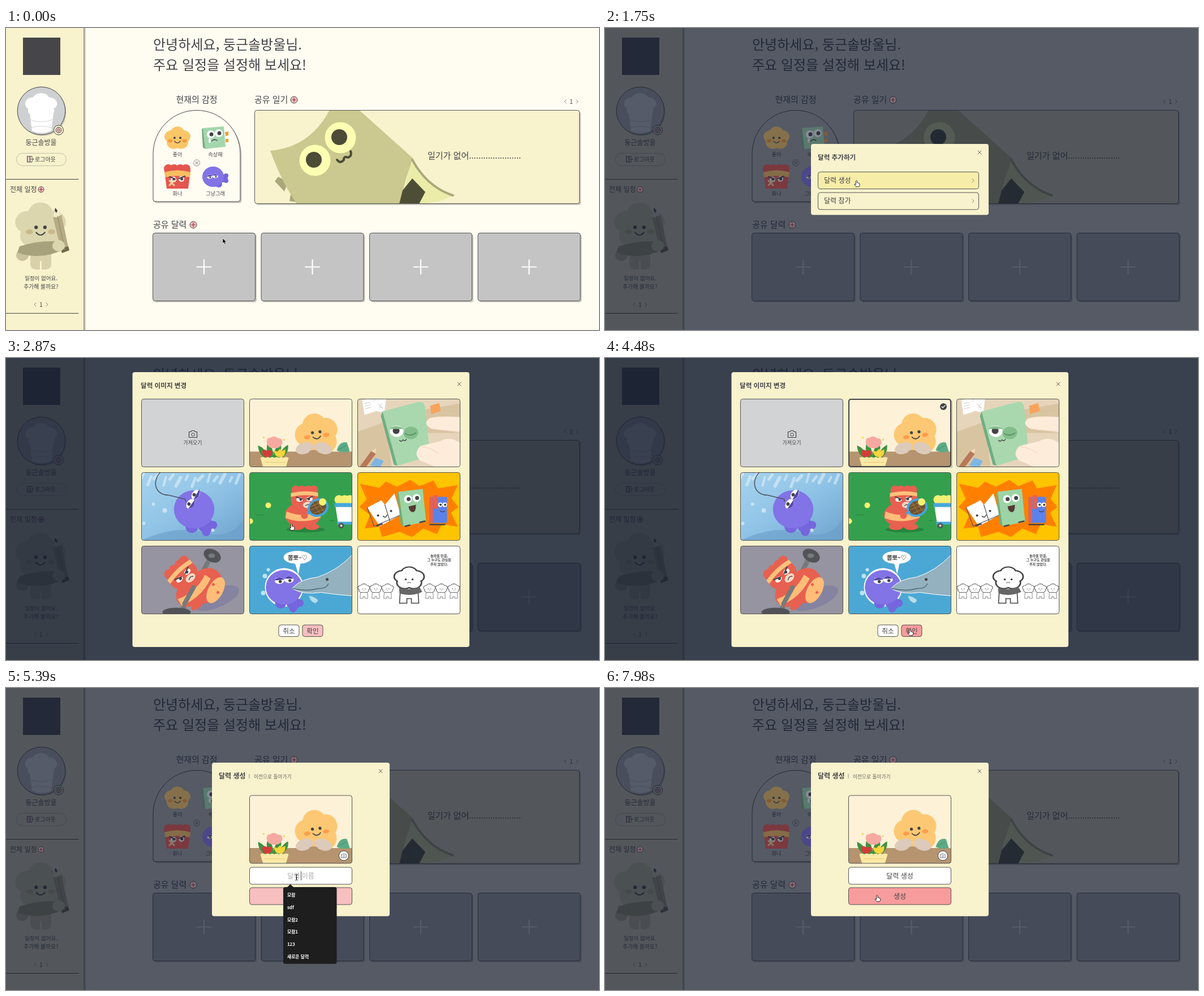
Recreate the animation shown at these times as an HTML page. Size 1048 by 534 pixels, loop 8000 ms.

```html
<!DOCTYPE html>
<html lang="ko">
<head>
<meta charset="utf-8">
<title>달력 만들기</title>
<style>
html, body { margin: 0; width: 100%; height: 100%; overflow: hidden; background: #fffdf2; }
svg { display: block; }
#stage { width: 100vw; height: 100vh; }
text { font-family: "Noto Sans CJK KR", "Noto Sans CJK", "Noto Sans", sans-serif; white-space: pre; }
</style>
</head>
<body>
<svg id="stage" viewBox="0 0 1048 534"></svg>
<script>
const INK = '#444446', PAPER = '#fffdf2', CREAM = '#f8f2cd', PINK = '#f7bfc0', ROSE = '#f79c9d';

// Drawing helpers
const rect = (x, y, w, h, fill, more = '') => `<rect x="${x}" y="${y}" width="${w}" height="${h}" fill="${fill}" ${more}/>`;
const circ = (x, y, r, fill, more = '') => `<circle cx="${x}" cy="${y}" r="${r}" fill="${fill}" ${more}/>`;
const oval = (x, y, rx, ry, fill, turn = 0, more = '') =>
  `<ellipse cx="${x}" cy="${y}" rx="${rx}" ry="${ry}" fill="${fill}" transform="rotate(${turn} ${x} ${y})" ${more}/>`;
const path = (d, fill, more = '') => `<path d="${d}" fill="${fill}" ${more}/>`;
const line = (d, color = INK, w = 1, more = '') =>
  path(d, 'none', `stroke="${color}" stroke-width="${w}" stroke-linecap="round" stroke-linejoin="round" ${more}`);
const text = (x, y, size, str, more = '') => `<text x="${x}" y="${y}" font-size="${size}" fill="${INK}" ${more}>${str}</text>`;
const group = (transform, body) => `<g transform="${transform}">${body}</g>`;
const layer = (id, body) => `<g id="${id}">${body}</g>`;
const MID = 'text-anchor="middle"', BOLD = 'font-weight="700"', EDGE = `stroke="${INK}"`;

const box = (x, y, w, h, fill, more = '') => rect(x, y, w, h, fill, `rx="4" ${EDGE} stroke-width=".9" ${more}`);
const raised = (x, y, w, h, fill) => rect(x + 2.5, y + 2.5, w, h, '#cbc9bd', 'rx="4"') + box(x, y, w, h, fill);
const panel = (x, y, w, h) => rect(x, y, w, h, CREAM, 'rx="4"');
const cross = (x, y, r = 3) => line(`M${x - r} ${y - r}l${2 * r} ${2 * r}m0 ${-2 * r}l${-2 * r} ${2 * r}`, '#555', .9);
const plus = (x, y, r) => circ(x, y, r, PINK, EDGE) + line(`M${x - r * .55} ${y}h${r * 1.1}M${x} ${y - r * .55}v${r * 1.1}`, '#8a3038', 1.2);
const chevron = (x, y, dir) => line(`M${x} ${y - 3}l${3 * dir} 3l${-3 * dir} 3`, '#777', .9);
const pager = (x, y) => chevron(x - 9, y, -1) + text(x, y + 4, 10.5, '1', MID) + chevron(x + 9, y, 1);
const petals = (x, y, dist, r, fill, squash = 1, turn = 0, more = '') => group(`translate(${x} ${y}) scale(1 ${squash})`,
  [0, 1, 2, 3, 4].map(i => {
    const a = (i * 72 - 90 + turn) * Math.PI / 180;
    return circ(dist * Math.cos(a), dist * Math.sin(a), r, fill, more);
  }).join('') + circ(0, 0, dist + 2, fill));
const smile = (x, y, s, cheek, turn = 0) => group(`translate(${x} ${y}) rotate(${turn}) scale(${s})`,
  oval(-15, 4, 5, 3.3, cheek) + oval(15, 4, 5, 3.3, cheek) +
  circ(-6, -2, 2.4, INK) + circ(6, -2, 2.4, INK) + line('M-6 5Q0 12 6 5', INK, 1.6));
const camera = (x, y, s) => group(`translate(${x} ${y}) scale(${s})`,
  line('M-7-4h3l2-2h4l2 2h3v10h-14z', INK, 1.2) + circ(0, 1, 2.8, 'none', EDGE));

// Characters, each around its own origin
const fish = (x, y, s, tailTurn = 0, face = '') => group(`translate(${x} ${y}) scale(${s})`,
  group(`rotate(${tailTurn})`, oval(18, 3, 8, 7, '#7566dd') + circ(23, -2, 4, '#7566dd') + circ(23, 7, 4, '#7566dd') + oval(10, 13, 6, 6, '#7566dd')) +
  oval(0, 0, 19, 18, '#8273e6') + group(face, oval(4, -1, 5, 3.4, '#fff') + oval(-6, 0, 5, 3.4, '#fff') +
  path('M-12 0q6-6 11-1zM-1-2q5-5 10 0z', '#5146a8') + circ(-5, 1, 1.6, INK) + circ(5, 0, 1.6, INK)));
const bandit = transform => group(transform,
  oval(-14, 52, 13, 6, '#e8604f') + oval(14, 52, 13, 6, '#e8604f') + oval(-3, 30, 33, 23, '#e8604f') +
  path('M-33 24Q-3 36 27 24L30 35Q-3 48-35 36z', '#ffbd78') +
  [-16, -5, 7, 17].map(x => circ(x, -16, 8, '#e8604f')).join('') + rect(-25, -17, 50, 32, '#e8604f', 'rx="12"') +
  path('M-25-10Q0-16 25-11V-4Q0-9-25-3z', '#ffc17c') + oval(6, 12, 9, 6, '#f8d8c4') +
  oval(-9, 2, 6, 4, '#fff') + oval(9, 1, 6, 4, '#fff') + circ(-7, 2, 2.4, INK) + circ(8, 1, 2.4, INK) +
  line('M-15-3l11 4M15-4l-11 5', INK, 2) + line('M2 13q5-4 9 0', INK, 1.3));
const eye = (x, y, r) => circ(x, y, r, '#fff') + circ(x + r * .15, y, r * .5, INK);

// Emotion icons and add buttons
const vivid = petals(303, 195, 11, 12.5, '#f9c668', .88) + smile(303, 196, .85, '#f59b3c') +
  path('M348 177l37-3 3 36-36 4z', '#a3d6ad') + path('M348 177l4 37-4-3-2-32z', '#6da97c') +
  path('M387 184l6-1v7l-5 1zM388 196h5v6h-5z', '#f59b3c') + eye(362, 188, 7) + eye(376, 186, 7) +
  line('M363 200q6-5 10-1', INK, 1.3) + oval(360, 199, 2, 4, '#fff') +
  [287, 297, 308, 318].map(x => circ(x, 249, 8, '#e4564e')).join('') + path('M280 252h46l-4 32h-38z', '#e4564e') +
  path('M280 255q23-7 46 0l-1 9q-22-5-44 0z', '#f9bd62') + eye(296, 268, 5) + eye(310, 267, 5) +
  line('M289 263l10 4M316 262l-10 4', INK, 2) + line('M289 270l8 8m0-8l-8 8', '#ffd29e', 3) +
  fish(366, 263, 1) + plus(509, 127, 6) + plus(331, 348, 6) + plus(62, 285.5, 5);

const sidebar = rect(139, 0, 2, 534, '#d5d2c0') + rect(0, 0, 138, 534, CREAM) + line('M138 0V534') +
  rect(30, 17, 66, 66, '#46464a') +
  circ(64.5, 149, 42, '#cbc8b2') + circ(62.5, 146.5, 42.3, '#cfd0d1', EDGE) +
  path('M42 150h42l-4 32q-17 7-34 0z', '#fff') + petals(62, 137, 14, 15, '#fff', .75) +
  line('M40 161q22 10 45 0M42 177q20-7 40 0', '#d4d5d6') +
  circ(93, 180.5, 8.5, CREAM, EDGE) + circ(93, 180.5, 5, PINK, EDGE) + circ(93, 180.5, 2, CREAM, EDGE) +
  text(62, 207, 12, '둥근솔방울', MID) + rect(18.5, 221.5, 88, 22, 'none', 'rx="11" stroke="#c3bfa8"') +
  rect(37.5, 227, 5, 10, PINK, EDGE) + line('M43 227h3v2M43 237h3v-2M43.5 232h5m-2-2l2 2-2 2') +
  text(51, 236, 10, '로그아웃') + line('M0 267.5H128M0 504.5H128') + text(7, 290, 12, '전체 일정') +
  oval(29, 402, 11, 10, '#c9c29b') + rect(43, 385, 37, 42, '#d8d1aa', 'rx="9"') + path('M60 412h3v16h-3z', CREAM) +
  petals(61, 350, 24, 22, '#dcd6ae', .9) +
  path('M24 386Q62 374 100 378l3 13Q62 412 20 397z', '#a8a27c') +
  path('M83 334l4-16 11 12 13 62-13 4z', '#b5ab84') + path('M83 334l4-16 11 12-8 5z', '#f2ebc8') +
  path('M86 323l1-5 4 5-2 4z', INK) + path('M97 390l13-4 2 7-13 5z', '#6d684b') + line('M91 333l13 59', '#9c9370', 1.5) +
  oval(93, 385, 11, 10, '#dcd6ae') + smile(61, 355, 1.3, '#c9b98b') +
  text(62, 446, 9.5, '일정이 없어요.', MID) + text(62, 461, 9.8, '추가해 볼까요?', MID) + pager(62, 489);

const diary = raised(439.5, 145.5, 574, 165, CREAM) + `<g clip-path="url(#diary)">` +
  path('M481 263l17 9-6 17-17-18zM504 289l12 7 12 14-27-4z', '#aaa87a') +
  path('M467 217Q537 211 572 145H624L720 231Q704 268 697 311H514Q488 274 467 217z', '#cbc98f') +
  path('M718 231Q742 282 791 296Q760 314 697 311z', '#ebeca8') + line('M718 233Q744 281 790 296', '#aaa87a', 4) +
  path('M718 266l23 24-11 21h-35l6-24z', '#4e4e36') +
  [[591, 194], [546, 234]].map(([x, y]) => circ(x, y, 27.5, '#fcffb2') + circ(x - 2, y - 1, 14, '#4c4c37')).join('') +
  line('M585 233q6 8 12 0q0-7 7-4q8-2 5-11', '#4c4c37', 4) + '</g>' +
  text(745, 231, 15, '일기가 없어' + '.'.repeat(22));

const page = rect(0, 0, 1048, 534, PAPER) + sidebar +
  text(260, 38, 24, '안녕하세요, 둥근솔방울님.') + text(260, 74, 24, '주요 일정을 설정해 보세요!') +
  text(337, 132, 15, '현재의 감정', MID) + text(439, 132, 15, '공유 일기') + text(260, 353, 15, '공유 달력') + pager(999, 130) +
  ['translate(2.5 2.5)', ''].map((move, i) => group(move, path('M260 222.5a77 77 0 0 1 154 0V303q0 4-4 4H264q-4 0-4-4z',
    i ? PAPER : '#cbc9bd', i ? EDGE : ''))).join('') +
  [[303, 227, '좋아'], [370, 227, '속상해'], [303, 296, '화나'], [370, 296, '그냥그래']].map(([x, y, s]) => text(x, y, 9.2, s, MID)).join('') +
  circ(337, 238.5, 5.5, PAPER, 'stroke="#888"') + cross(337, 238.5, 2.3) + diary +
  [259.5, 451, 642.5, 834].map(x => raised(x, 362.5, 181, 120, '#c4c4c4') + line(`M${x + 78} 422.5h25m-12.5-12.5v25`, '#fff', 2.2)).join('') +
  layer('vivid', vivid);

// Calendar pictures on a 181 x 120 card
const shot = rect(0, 0, 181, 120, '#fdf1d8') + petals(119, 64, 18, 21, '#fcc873', 1, -15) + rect(0, 93, 181, 27, '#b5946f') +
  smile(118, 61, 1.12, '#ff9d4d', -7) + path('M154 91q5-17 18-14q3 9 5 16q-14 3-23-2z', '#5cab86') + line('M158 89l13-7', '#3f8f6b', 1) +
  oval(97, 87, 16, 10, '#dccabb', -18) + oval(130, 87, 16, 10, '#dccabb', 18) + oval(113, 94, 8, 4, '#b5946f') +
  path('M30 106q-15-8-15-24q13 5 17 20q-4-18 1-25q9 10 9 24q3-18 12-22q5 8-3 22q7-15 17-20q2 16-14 25z', '#3f913f') +
  path('M30 76q1-9 6-7q7-6 15 1q7-2 7 8q-4 10-14 9q-12 1-14-11z', '#f6a9a0') +
  path('M22 92q5-5 9 0q8-4 9 3q-3 10-11 8q-7-2-7-11z', '#d23d39') + path('M43 91l6 2 5-5 3 4 6-3q1 14-10 14q-9-1-10-12z', '#f7d33c') +
  circ(25, 68, 1.6, '#f7d33c') + circ(61, 72, 1.6, '#f7d33c') +
  path('M19 104q5-3 9 0q4-3 8 0q4-3 8 0q4-3 8 0q4-3 8 0q5-3 9 0l-5 17H24z', '#fbe9a5') + line('M27 112h36', '#e3c979', 1);

const desk = rect(0, 0, 181, 120, '#e6d5bb') + path('M0 58L50 40 60 120H0zM110 20L181 8V60H115z', '#d9c4a2') +
  path('M8 2l20-4 3 24-19 6zM30 0h20l-3 24-20-4z', '#fff') + line('M12 8l10-2m-9 7l10-3m-9 7l9-2M36 8l8 8-6-2 5-6', '#bbb', .8) +
  path('M128 12l16-5 3 14-17 6z', '#f7a35c') +
  path('M44 22L108 5q9-1 11 8l9 88-58 17z', '#a9d8ae') + path('M44 22l26 96-6-2L41 30z', '#6eae82') +
  path('M181 32q-36-3-54 2q-14 10 4 19l50 6zM181 78q-18-14-36-3l-34 8q-14 14 0 26l26 11h44z', '#fdecda') +
  line('M135 53q20 4 46 4M112 84q18 2 30 12', '#ecd2b8', 1) +
  oval(69, 57, 12, 10, '#fff') + circ(68, 56, 6, INK) + oval(94, 60, 13, 11, '#83bd8c', -8) + line('M84 61q9 6 19-1', '#4e8159', 1.4) +
  path('M56 53q12-10 26 0z', '#83bd8c') + line('M74 73q3 4 6-1q4 4 6-1', INK, 1.4) +
  path('M4 119l20-27 9-6-1 11-18 24z', '#b77957') + path('M24 92l9-6-1 11z', '#f2d7b6') + path('M22 118l9-14 15 5-6 12z', '#7eb6e2');

const sea = rect(0, 0, 181, 120, 'url(#water)') +
  [...Array(14).keys()].map(i => line(`M${4 + i * 13} ${2 + i * 5 % 9}l-${4 + i % 3 * 2} ${8 + i * 7 % 14}`, '#eef8fd', 4 + i % 3, 'opacity=".5"')).join('') +
  path('M0 120Q60 92 110 106T181 80v40z', '#6c9fca', 'opacity=".6"') +
  fish(93, 65, 1.88, 45, 'translate(-2 -9) rotate(125)') + line('M33 0C18 16 24 40 48 40T77 47l1 4', '#4d5866', 1.6) +
  [[4, 90, 3], [21, 56, 3], [41, 67, 4], [126, 102, 3]].map(([x, y, r]) => circ(x, y, r, '#c7e3f4')).join('');

const court = rect(0, 0, 181, 120, '#34a04e') + oval(99, 101, 34, 5, '#26853e') + bandit('translate(97 46) scale(.96)') +
  oval(121, 62, 17, 14, '#6b5530', -25, 'stroke="#45a5e0" stroke-width="4"') +
  line('M109 60l20-9m-20 15l25-11m-20 17l20-8M111 52l14 21m-7-24l13 20', '#b97746', 1) + line('M107 70l-12 6', '#45a5e0', 4) + circ(97, 76, 6, '#e8604f') +
  [[129, 52, 6.5], [33, 58, 5], [1, 86, 5]].map(([x, y, r]) => circ(x, y, r, '#f6f36f')).join('') +
  [158, 168, 177].map(x => circ(x, 48, 8, '#f2ef75')).join('') + path('M150 54h31v7h-31z', '#46a9de') + path('M152 61h29v27h-25z', '#fff') +
  path('M155 87h26v5h-26z', '#46a9de') + circ(162, 94, 5, '#555') + circ(162, 94, 2, '#ddd') + line('M12 75h14M142 85h7', '#247f3d', 1);

const burst = rect(0, 0, 181, 120, '#ffc400') +
  path('M4 20l34 7 12-11 19 9 24-12 16 11 25-10 8 14 35-6-11 24 12 15-13 10 12 25-28-5-9 18-24-10-20 15-22-9-31 9-5-18-26 3 10-24L3 61l13-14z', '#ff8000') +
  path('M17 62l25-13 6 8 17-20 11 38-37 20z', '#fff') + line('M48 57l9 29M17 62l12 33 47-20', '#555', 1.2) + circ(36, 76, 2, INK) + circ(59, 68, 2, INK) + line('M45 77q4 5 7-2', INK, 1.5) +
  group('translate(-1 -5)', path('M73 39l43-5 6 58-40 8z', '#9dd4a5') + path('M73 39l9 61-5-4-6-52z', '#6fae7f') + eye(90, 52, 7) + eye(105, 50, 7) +
    path('M91 65l13-3q0 14-6 13t-7-10z', '#543b36')) +
  rect(127, 43, 31, 46, '#5b82ea', 'rx="2"') + rect(127, 43, 6, 46, '#e8604f') + rect(134, 40, 8, 24, '#e8604f') +
  eye(146, 57, 4) + eye(154, 57, 4) + line('M146 68q4 3 8 0', INK, 1.4) + line('M34 94l9-3M84 95l8-2M110 88l9-2M128 92h26', INK, 2.5);

const gym = rect(0, 0, 181, 120, '#9594a0') + oval(132, 92, 43, 17, '#8683a0', -22) +
  line('M68 120L123 18', '#777a7c', 8) + oval(125, 17, 16, 11, '#515356', 28) + oval(124, 17, 6, 4, '#777a7c') + oval(62, 117, 25, 8, '#515356') +
  oval(115, 70, 28, 32, '#e8604f', 25) + bandit('translate(73 51) rotate(-42) scale(1.08)') +
  oval(131, 78, 13, 25, '#ffbd78', 28) + line('M76 102l16-29', '#777a7c', 8) + circ(127, 68, 2.5, '#e8604f') + circ(135, 82, 2.5, '#e8604f');

const kiss = rect(0, 0, 181, 120, '#4ba8d4') + circ(61, 73, 34, '#fff') + fish(61, 73, 1.7, 50, 'translate(1 -7)') +
  path('M75 75Q90 58 120 55Q154 44 181 16V88Q152 86 126 82Q95 87 75 75z', '#93b1bf', 'stroke="#fff"') +
  line('M76 75q26 6 45 0q14 1 18-8', '#4f6772', 1.4) + circ(137, 59, 2.5, INK) +
  path('M105 88q11 2 16 8l-4 5q-10-2-12-13z', '#b6ddea') + oval(85, 20, 25, 11.5, '#fff') + path('M80 29l6 21 4-20z', '#fff') +
  text(85, 24, 10, '뽑뽀~♡', `${MID} ${BOLD}`) + circ(27, 53, 4, '#bde2f1') + circ(33, 42, 3, '#bde2f1') + circ(24, 83, 4, '#bde2f1');

const doodle = (x, y, s) => group(`translate(${x} ${y}) scale(${s})`,
  path('M-15 12h30l2 32h-13v-8h-8v8h-13z', '#fff', `${EDGE} stroke-width="1.6"`) +
  petals(0, 0, 13, 14, '#fff', .74, 0, `${EDGE} stroke-width="3"`) + petals(0, 0, 13, 12.6, '#fff', .74) +
  circ(-6, 2, 1.8, INK) + circ(6, 2, 1.8, INK) + line('M-3 8q3-2 6 0'));
const lonely = rect(0, 0, 181, 120, '#fff') + [11, 32, 53, 127, 148, 170].map(x => doodle(x, 75, .4)).join('') + doodle(91, 57, 1) +
  path('M73 73q18 7 36-1l5 9q-18 9-40 3z', '#666') +
  ['놀라울 만큼,', '그 누구도 관심을', '주지 않았다.'].map((s, i) => text(144, 19 + i * 7.5, 6, s, `${MID} ${BOLD}`)).join('');

const importCard = rect(0, 0, 181, 120, '#d2d3d4') + camera(91, 62, 1) + text(90.5, 80, 9, '가져오기', MID);

const card = (x, y, art) => group(`translate(${x} ${y})`, `<g clip-path="url(#card)">${art}</g>` + box(0, 0, 181, 120, 'none'));
const cards = [importCard, shot, desk, sea, court, burst, gym, kiss, lonely]
  .map((art, i) => card(239.5 + i % 3 * 191, 72.5 + Math.floor(i / 3) * 130, art)).join('');

// Dialogs
const choice = (id, y, label) => box(376.5, y, 284, 30, CREAM, `id="${id}"`) + text(387, y + 19, 12, label) + chevron(649, y + 15, 1);
const menu = panel(364, 205, 314, 125.5) + text(376, 233, 11.6, '달력 추가하기', BOLD) + cross(662, 220) +
  choice('make', 254.5, '달력 생성') + choice('join', 291, '달력 참가');
const form = panel(364, 132, 314, 271.5) + text(376, 160, 12, '달력 생성', BOLD) + line('M430 152.5v7', '#777', .8) +
  text(438, 159.5, 8.7, '이전으로 돌아가기', 'opacity=".8"') + cross(662, 147) +
  card(430.5, 190, rect(0, 0, 181, 120, '#c4c4c4') + layer('chosen', shot)) + circ(597, 296.5, 8.5, '#fff', EDGE) + camera(597, 296.5, .6) +
  box(430.5, 317, 181, 30, '#fff') + text(521, 336.5, 12, '', `${MID} id="entry"`) + line('M0 324.5v15', INK, 1, 'id="caret"') +
  box(430.5, 353, 181, 30, PINK, 'id="create"') + text(521, 372.5, 12, '생성', MID) + layer('hints', '');
const chooser = rect(0, 0, 1048, 534, '#171f32', 'opacity=".45"') + panel(223.5, 25, 595.5, 486) +
  text(238, 52.5, 11.6, '달력 이미지 변경', BOLD) + cross(801, 46) +
  layer('lift', path('M433 194h181V76h-2v116H433z', '#c5c0a4')) + cards +
  layer('picked', rect(431, 73, 180, 119, 'none', `rx="4" ${EDGE} stroke-width="2"`) + circ(598, 86, 6, INK) + line('M595 86l2 2 4-4', '#fff', 1.2)) +
  box(482, 472, 36, 20.5, '#fff') + text(500, 486.5, 11.6, '취소', MID) + box(524, 472, 36, 20.5, PINK, 'id="confirm"') + text(542, 486.5, 11.6, '확인', MID);

const pointers = layer('arrow', path('M0 0v9l2-2 1.6 3.2 1.7-.8L3.8 6.4h2.9z', '#000', 'stroke="#fff" stroke-width=".6"')) +
  layer('hand', path('M-1.2 1q1.2-2 2.4 0v3.2q1.2-.6 1.8.5q1.2-.4 1.6.7q1.2 0 1.1 1.4q0 2.5-1.3 4.4h-5Q-2.6 9-4 6.8q.6-1.3 2.8.6z', '#fff', 'stroke="#111" stroke-width=".9"')) +
  layer('beam', line('M-2-5q2 0 2 1.5Q0-5 2-5M0-4v8M-2 5q2 0 2-1.5Q0 5 2 5M-1 1h2', '#111', 1));

const $ = id => document.getElementById(id);
$('stage').innerHTML = `<defs><clipPath id="card">${rect(0, 0, 181, 120, '#000', 'rx="4"')}</clipPath>
  <clipPath id="diary">${rect(440, 146, 573, 164, '#000', 'rx="4"')}</clipPath>
  <linearGradient id="water" x2="1" y2="1"><stop stop-color="#a6d3ee"/><stop offset=".5" stop-color="#8fc3e6"/><stop offset="1" stop-color="#6fa3cd"/></linearGradient></defs>` + page +
  layer('veil', rect(0, 0, 1048, 534, '#171f32', 'opacity=".73"') + '<use id="glow" href="#vivid" opacity=".3"/>') +
  layer('menu', menu) + layer('form', form) + layer('chooser', chooser) + layer('pointer', pointers);

// Timeline: pointer tip as [time, x, y]
const TRACK = [[0, 383, 372], [70, 383, 372], [840, 331, 347], [910, 330, 345], [1260, 330, 345], [1750, 444.5, 269.5],
  [2100, 444.5, 269.5], [2660, 504.5, 293.5], [3220, 504.5, 293.5], [3640, 519, 181], [3780, 520, 180.5], [3920, 520, 180.5],
  [4480, 539, 479.5], [4620, 539, 479.5], [5250, 513.5, 335], [7420, 513.5, 330], [7630, 500, 285], [7980, 481, 366.5]];
const TYPED = [[5950, 'ㄷ'], [6020, '다'], [6160, '달'], [6300, '달려'], [6440, '달력'], [6510, '달력 '],
  [6650, '달력 ㅅ'], [6720, '달력 새'], [6790, '달력 생'], [7000, '달력 생ㅅ'], [7070, '달력 생서'], [7140, '달력 생성']];
const SAVED = ['모람', 'sdf', '모람2', '모람1', '123', '새로운 달력'], MATCHES = ['달력 생성 12/24', '달력 테스트'];

function pointerAt(t) {
  const i = Math.max(1, TRACK.findIndex(k => k[0] >= t));
  const [t0, x0, y0] = TRACK[i - 1], [t1, x1, y1] = TRACK[i];
  const p = (t - t0) / (t1 - t0), e = p * p * (3 - 2 * p);
  return [x0 + (x1 - x0) * e, y0 + (y1 - y0) * e];
}
function hintsAt(t, value) {
  if (t < 5390 || t >= 7490) return [];
  if (!value) return SAVED;
  const count = { '달': 2, '달력': 2, '달력 ': 2, '달력 생': 1, '달력 생성': 1 }[value] || 0;
  return MATCHES.slice(0, count);
}
const show = (id, on) => $(id).setAttribute('visibility', on ? 'inherit' : 'hidden');
const tint = (id, on, hot, cool) => $(id).setAttribute('fill', on ? hot : cool);

function draw(t) {
  const [x, y] = pointerAt(t);
  const over = (left, top, w, h) => x > left && x < left + w && y > top && y < top + h;
  const isMenu = t >= 1050 && t < 2100, isChooser = t >= 2870 && t < 4620, isForm = t >= 2100 && !isChooser;
  show('veil', t >= 1050);
  $('veil').setAttribute('opacity', t < 1120 ? .6 : 1);
  show('glow', t >= 1050 && !isChooser);
  show('menu', isMenu);
  show('form', isForm);
  show('chooser', isChooser);
  show('lift', isChooser && t >= 3920);
  show('picked', isChooser && t >= 3920);
  show('chosen', isForm && t >= 4620);

  const make = isMenu && over(376, 254, 285, 31), join = isMenu && over(376, 291, 285, 30);
  const create = isForm && over(430, 353, 181, 30), confirm = isChooser && over(524, 472, 36, 21);
  tint('make', make, '#f6eda8', CREAM);
  tint('join', join, '#f6eda8', CREAM);
  tint('create', create, ROSE, PINK);
  tint('confirm', confirm, ROSE, PINK);

  const value = (TYPED.filter(k => k[0] <= t).pop() || [0, ''])[1];
  $('entry').textContent = value || '달력 이름';
  $('entry').setAttribute('fill', value ? INK : '#aaa');
  const caretX = value ? 521.5 + $('entry').getComputedTextLength() / 2 : 521.5;
  $('caret').setAttribute('transform', `translate(${caretX} 0)`);
  show('caret', isForm && t >= 5390 && t < 7490 && !(t >= 5810 && t < 5950));
  const hints = hintsAt(t, value);
  $('hints').innerHTML = hints.length ? path('M496 353l6.5-6 6.5 6z', '#1e1e1e') + rect(490, 352, 94.5, 5 + 21.8 * hints.length, '#1e1e1e', 'rx="3.5"') +
    hints.map((s, i) => text(497, 369 + 21.8 * i, 7.8, s, `${BOLD} style="fill:#fff"`)).join('') : '';

  const typing = t >= 5950 && t < 7490;
  const beam = isForm && t >= 4620 && over(430, 317, 181, 30);
  const onCard = isForm && over(430, 190, 181, 120);
  const hand = t >= 910 && t < 1330 || make || join || create || isChooser || onCard;
  $('pointer').setAttribute('transform', `translate(${x.toFixed(1)} ${y.toFixed(1)})`);
  show('beam', beam && !typing);
  show('hand', hand && !beam && !typing);
  show('arrow', !hand && !beam && !typing);
}

const start = performance.now();
let last = -1;
function tick() {
  const t = Math.floor((performance.now() - start) % 8000 / 70) * 70;
  if (t !== last) draw(last = t);
  requestAnimationFrame(tick);
}
tick();
</script>
</body>
</html>
```
